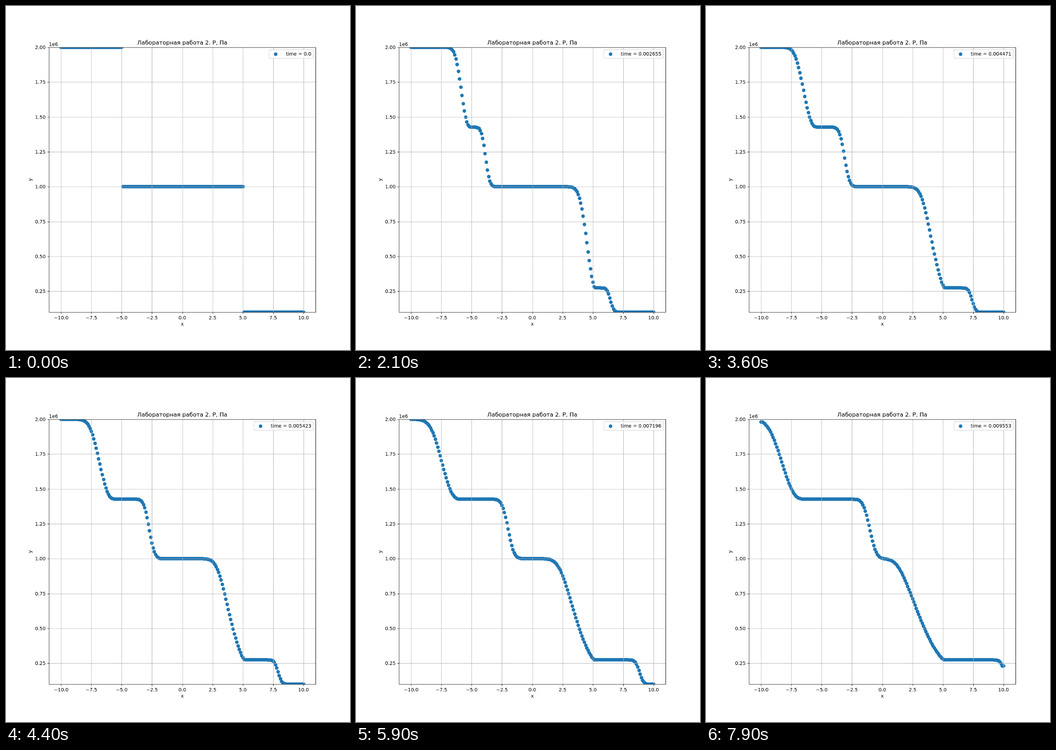
An HTML page with a canvas for the animation above (8000 ms loop, 748 px wide and 748 px high).

```html
<!DOCTYPE html>
<html lang="ru">
<head>
<meta charset="utf-8">
<title>Лабораторная работа 2</title>
<style>
  html, body { margin: 0; width: 100%; height: 100%; overflow: hidden; background: #fff; }
  canvas { display: block; }
</style>
</head>
<body>
<canvas id="plot" width="748" height="748"></canvas>
<script>
const LOOP = 8000, STEP = 100;
const SIZE = 1000; // the figure is drawn at this size, then scaled to the stage
const PT = 100 / 72, EM = 10 * PT;
const AX = { l: 125, r: 900, t: 120, b: 890 };
const BLUE = '#1f77b4';
const FONT = '"DejaVu Sans", Verdana, sans-serif';

const stage = document.getElementById('plot').getContext('2d');
stage.imageSmoothingQuality = 'high';
const figure = document.createElement('canvas');
figure.width = figure.height = SIZE;
const ctx = figure.getContext('2d');

const px = x => AX.l + (x + 11) / 22 * (AX.r - AX.l);
const py = p => AX.b - (p - 0.1) / 1.9 * (AX.b - AX.t);
const snap = v => Math.floor(v + 0.5) + 0.5;

// Simulated time in ms: a steady step plus a decaying start-up lead.
const clock = k => 0.1177 * k + 0.373 * (1 - Math.exp(-k / 12.2));

// Falls from 1 to 0 around c like a normal curve; lean sharpens the right side.
function fall(x, c, width, lean = 0) {
  const u = (x - c) / width;
  const z = u + lean * Math.max(u, 0) ** 3;
  return 1 / (1 + Math.exp(1.5976 * z + 0.07056 * z ** 3));
}

// Fan with its foot held at 5.15 and its head running left.
function fan(x, t) {
  const v = (Math.max(0, 5.15 - x) / (0.1 + 0.38 * t)) ** 1.45;
  const m = Math.max(1, 0.82 * Math.sqrt(t));
  return Math.tanh(v ** m) ** (1 / m);
}

// Pressure in MPa: two breaks at t = 0, each sending a fan left and a shock right.
function pressure(x, t) {
  if (t === 0) return x < -4.95 ? 2 : x < 5.05 ? 1 : 0.1;
  return 0.1
    + 0.573 * fall(x, -4.95 - 0.358 * t, 0.208 * t ** 0.618, 0.085)
    + 0.427 * fall(x, -4.95 + 0.41 * t, 0.1925 * t ** 0.361)
    + 0.726 * fan(x, t)
    + 0.174 * fall(x, 5.05 + 0.527 * t, 0.192 * t ** 0.153);
}

function line(x1, y1, x2, y2) {
  ctx.beginPath();
  ctx.moveTo(x1, y1);
  ctx.lineTo(x2, y2);
  ctx.stroke();
}

function dot(x, y) {
  ctx.beginPath();
  ctx.arc(Math.round(x), Math.round(y), 3.75 * PT, 0, 2 * Math.PI);
  ctx.fill();
}

function text(str, x, y, align = 'center', size = EM) {
  ctx.font = `${size}px ${FONT}`;
  ctx.textAlign = align;
  ctx.fillStyle = '#000';
  ctx.fillText(str, x, Math.round(y));
}

function drawDots(t) {
  ctx.save();
  ctx.beginPath();
  ctx.rect(AX.l, AX.t, AX.r - AX.l, AX.b - AX.t);
  ctx.clip();
  ctx.fillStyle = BLUE;
  for (let i = 0; i <= 200; i++) {
    const inner = Math.min(199, Math.max(1, i)); // end cells copy their neighbours
    dot(px(-10 + i / 10), py(pressure(-10 + inner / 10, t)));
  }
  ctx.restore();
}

function drawAxes() {
  const xTicks = Array.from({ length: 9 }, (_, i) => -10 + 2.5 * i);
  const yTicks = Array.from({ length: 8 }, (_, i) => 0.25 * (i + 1));
  const left = snap(AX.l), right = snap(AX.r), top = snap(AX.t), bottom = snap(AX.b);
  const tick = 3.5 * PT;

  ctx.lineWidth = 0.8 * PT;
  ctx.strokeStyle = '#b0b0b0';
  xTicks.forEach(v => line(snap(px(v)), AX.t, snap(px(v)), AX.b));
  yTicks.forEach(v => line(AX.l, snap(py(v)), AX.r, snap(py(v))));

  ctx.strokeStyle = '#000';
  for (const v of xTicks) {
    line(snap(px(v)), bottom, snap(px(v)), bottom + tick);
    text(v.toFixed(1).replace('-', '\u2212'), px(v), 911);
  }
  for (const v of yTicks) {
    line(left - tick, snap(py(v)), left, snap(py(v)));
    text(v.toFixed(2), AX.l - 2 * tick, py(v) + 5, 'right');
  }
  ctx.strokeRect(left, top, right - left, bottom - top);

  const middle = (AX.l + AX.r) / 2;
  text('1e6', AX.l, 116, 'left');
  text('x', middle, 929);
  text('Лабораторная работа 2. P, Па', middle, AX.t - 6 * PT, 'center', 12 * PT);
  ctx.save();
  ctx.translate(75, (AX.t + AX.b) / 2);
  ctx.rotate(-Math.PI / 2);
  text('y', 0, 0);
  ctx.restore();
}

function drawLegend(label) {
  ctx.font = `${EM}px ${FONT}`;
  const right = AX.r - 0.5 * EM, top = AX.t + 0.5 * EM, base = 144;
  const start = right - 0.4 * EM - ctx.measureText(label).width;
  const left = start - 3.2 * EM;
  ctx.beginPath();
  ctx.roundRect(left, top, right - left, 25, 0.2 * EM);
  ctx.fillStyle = 'rgba(255,255,255,0.8)';
  ctx.fill();
  ctx.lineWidth = PT;
  ctx.strokeStyle = 'rgba(204,204,204,0.8)';
  ctx.stroke();
  ctx.fillStyle = BLUE;
  dot(start - 1.8 * EM, base - 0.2625 * EM);
  text(label, start, base, 'left');
}

function draw(now) {
  const k = Math.max(0, Math.floor((now % LOOP) / STEP) - 1);
  const t = clock(k);
  ctx.fillStyle = '#fff';
  ctx.fillRect(0, 0, SIZE, SIZE);
  drawDots(t);
  drawAxes();
  drawLegend(' time = ' + (k ? Math.round(t * 1000) / 1e6 : '0.0'));
  stage.drawImage(figure, 0, 0, 748, 748);
  requestAnimationFrame(draw);
}
requestAnimationFrame(draw);
</script>
</body>
</html>
```
